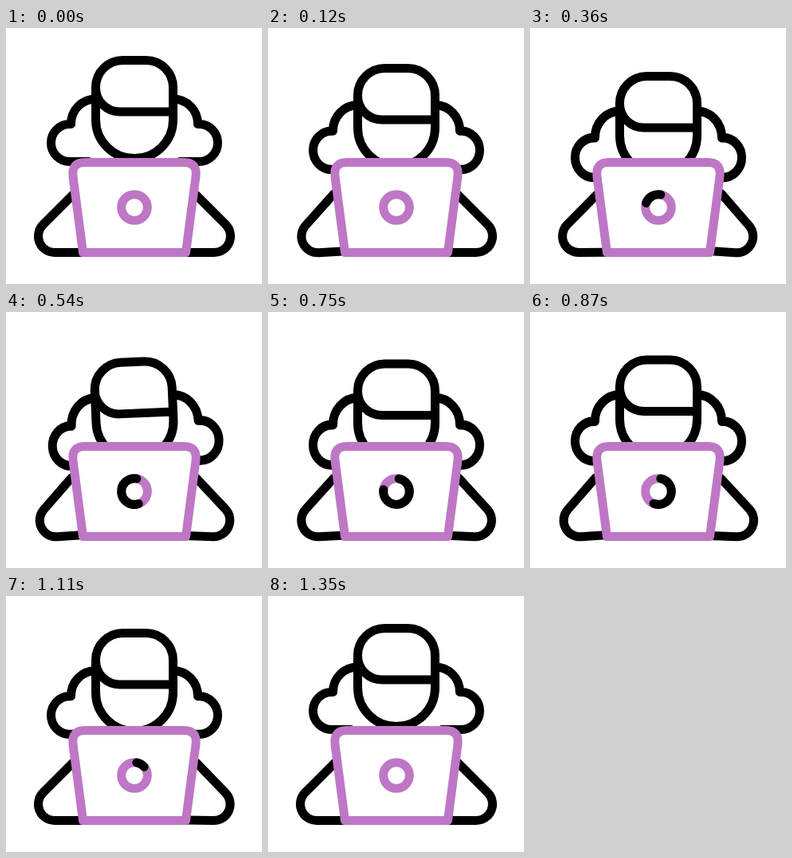
Recreate the animation shown at these times as an HTML page. Size 321 by 321 pixels, loop 1500 ms.

```html
<!DOCTYPE html>
<html lang="en">
<head>
<meta charset="utf-8">
<title>Working at a laptop</title>
<style>
  html, body { margin: 0; width: 100%; height: 100%; overflow: hidden; background: #fff; }
  svg { display: block; width: 100vw; height: 100vh; }
  .line { fill: none; stroke: #000; stroke-width: 11; stroke-linecap: round; stroke-linejoin: round; }
  .accent { stroke: #be77c5; }
  .solid { fill: #fff; }
</style>
</head>
<body>
<svg viewBox="0 0 321 321" class="line">
  <defs>
    <path id="curl" d="M112.5 89A31 31 0 0 0 81.5 120.5H80A23.5 23.5 0 0 0 80 167.5H104"/>
    <path id="arm" d="M84 209L46.5 246.5A20.5 20.5 0 0 0 61 281.5H95"/>
  </defs>

  <g id="left"><use href="#arm"/></g>
  <g transform="matrix(-1 0 0 1 322 0)"><g id="right"><use href="#arm"/></g></g>

  <g id="head">
    <g id="hair">
      <use href="#curl"/>
      <use href="#curl" transform="matrix(-1 0 0 1 322 0)"/>
    </g>
    <path class="solid" d="M112.5 74.5a34 34 0 0 1 34-34h29a34 34 0 0 1 34 34V115a48.5 48.5 0 0 1-97 0Z"/>
    <path d="M112.5 75a30 30 0 0 0 30 30H209.5"/>
  </g>

  <path class="accent solid" d="M96.5 281.5L84 186Q82 168.5 99 168.5H223Q240 168.5 238 186L225.5 281.5Z"/>
  <circle class="accent" cx="161" cy="225" r="16.3"/>
  <path id="arc"/>
</svg>

<script>
  const LOOP = 1500, STEP = 30;
  const $ = id => document.getElementById(id);
  const head = $('head'), hair = $('hair'), left = $('left'), right = $('right'), arc = $('arc');

  const span = (t, a, b) => Math.min(1, Math.max(0, (t - a) / (b - a)));
  const smooth = p => p * p * (3 - 2 * p);

  // Three taps of one hand, as a rotation about the middle of the arm.
  function tap(t, start) {
    const p = span(t, start, start + 960) * 3;
    return -4.2 * Math.abs(Math.sin(Math.PI * p));
  }

  function headDrop(t) {
    if (t < 360) return 20 * smooth(span(t, 30, 210));
    if (t < 750) return 20 + 4.5 * span(t, 360, 750);
    return 24.5 * (1 - smooth(span(t, 750, 1350) ** 0.76));
  }

  // Point on the ring, counted counterclockwise from just right of the top.
  function ringPoint(deg) {
    const a = (deg - 10) * Math.PI / 180;
    return (161 - 16.3 * Math.sin(a)).toFixed(2) + ' ' + (225 - 16.3 * Math.cos(a)).toFixed(2);
  }

  function arcPath(from, to) {
    if (to - from < 0.5) return '';
    const mid = (from + to) / 2;
    const seg = deg => `A16.3 16.3 0 0 0 ${ringPoint(deg)}`;
    return `M${ringPoint(from)}${seg(mid)}${seg(to)}`;
  }

  function draw(now) {
    const t = Math.floor((now % LOOP) / STEP) * STEP;
    const drop = headDrop(t);
    const tilt = -2.5 * Math.sin(Math.PI * span(t, 360, 750)) ** 2;
    head.setAttribute('transform', `translate(0 ${drop}) rotate(${tilt} 161 104)`);
    // The curls stretch a little as the head sinks.
    hair.setAttribute('transform', `translate(0 168) scale(1 ${1 + 0.003 * drop}) translate(0 -168)`);
    left.setAttribute('transform', `rotate(${tap(t, 30)} 67 236)`);
    right.setAttribute('transform', `rotate(${tap(t, 175)} 67 236)`);
    arc.setAttribute('d', arcPath(360 * span(t, 606, 1170), 360 * span(t, 248, 752)));
  }

  let origin;
  function tick(now) {
    origin ??= now;
    draw(now - origin);
    requestAnimationFrame(tick);
  }
  draw(0);
  requestAnimationFrame(tick);
</script>
</body>
</html>
```
